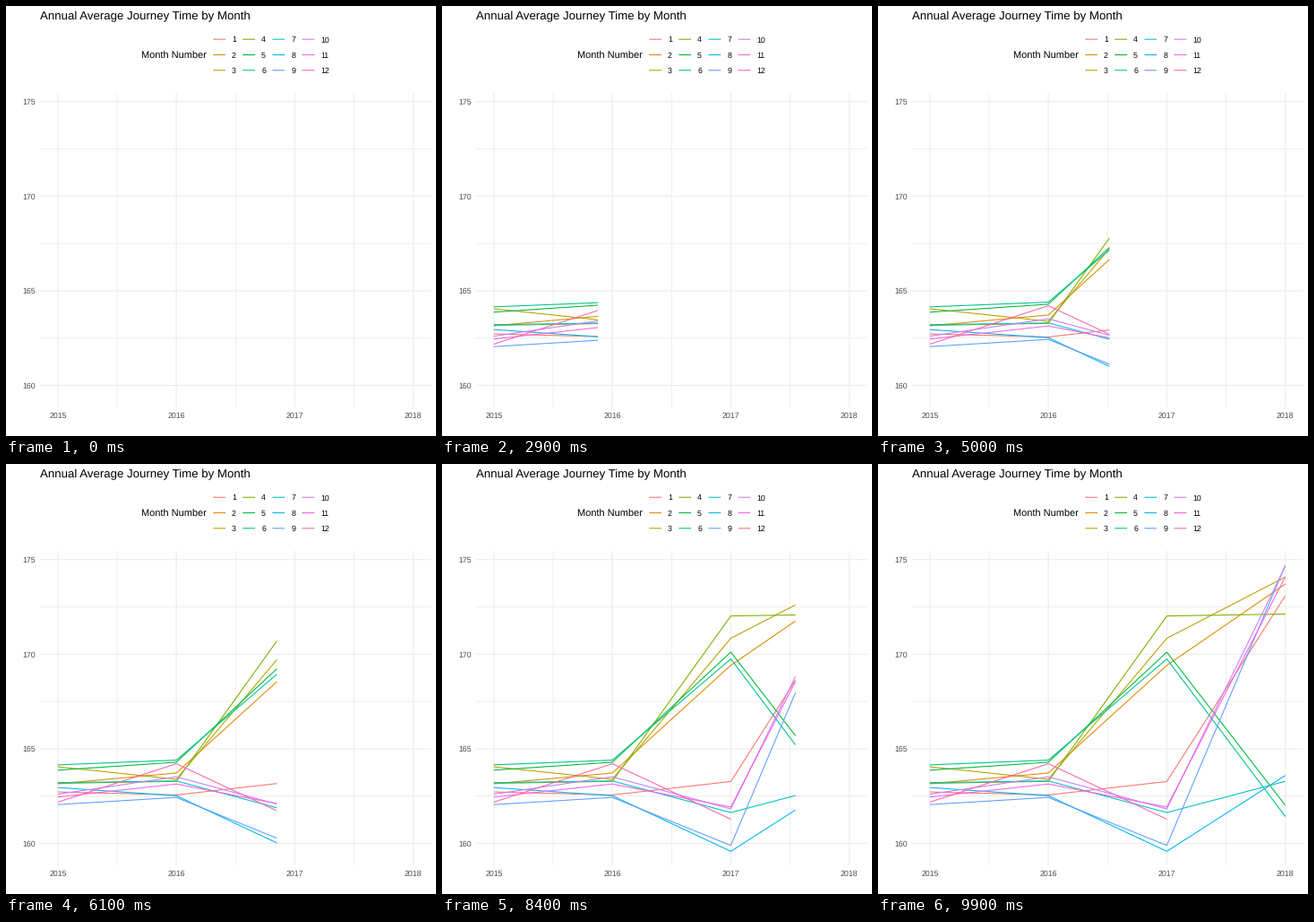
Animation, 480 px wide and 480 px high, one loop 10000 ms. Source, as a matplotlib script:

```python
import numpy as np
import matplotlib.pyplot as plt
from matplotlib.animation import FuncAnimation

SIZE, DPI = 480, 72  # at 72 dpi one point is one pixel
FRAMES, INTERVAL = 100, 100
LEFT, RIGHT, TOP, BOTTOM = 38, 474.5, 97, 448

plt.rcParams.update({
    "font.family": "Liberation Sans",
    "text.hinting": "none",
    "path.snap": False,
})

COLORS = ["#F8766D", "#DE8C00", "#B79F00", "#7CAE00", "#00BA38", "#00C08B",
          "#00BFC4", "#00B4F0", "#619CFF", "#C77CFF", "#F564E3", "#FF64B0"]

# Average journey time per month, one value per year from 2015
SERIES = [
    [162.72, 162.56, 163.27, 173.09],
    [163.15, 163.72, 169.41, 173.71],
    [164.05, 163.39, 170.84, 174.08],
    [163.17, 163.28, 172.02, 172.12],
    [163.87, 164.29, 170.11, 162.01],
    [164.15, 164.40, 169.75, 161.42],
    [163.21, 163.30, 161.63, 163.28],
    [162.95, 162.52, 159.58, 163.59],
    [162.05, 162.43, 159.89, 174.70],
    [162.60, 163.52, 161.82, 174.65],
    [162.45, 163.14, 161.92, 174.09],
    [162.18, 164.21, 161.28],
]


def px(year):
    return 57.85 + (np.asarray(year) - 2015) * 132.28


def py(value):
    return 423.5 - (np.asarray(value) - 160) * 21.12


fig = plt.figure(figsize=(SIZE / DPI, SIZE / DPI), dpi=DPI, facecolor="white")
ax = fig.add_axes([0, 0, 1, 1])
ax.set(xlim=(0, SIZE), ylim=(SIZE, 0))
ax.axis("off")


def stroke(xs, ys, color, width=1.07):
    return ax.plot(xs, ys, color=color, lw=width, solid_capstyle="butt",
                   solid_joinstyle="round", snap=False)[0]


def label(x, y, text, size=8.8, color="black", ha="left"):
    ax.text(x, y, text, size=size, color=color, ha=ha, va="baseline")


def grid(years, values, width):
    for v in values:
        stroke([LEFT, RIGHT], [py(v)] * 2, "#EBEBEB", width)
    for yr in years:
        stroke([px(yr)] * 2, [TOP, BOTTOM], "#EBEBEB", width)


years, ticks = range(2015, 2019), range(160, 176, 5)
grid([2015.5, 2016.5, 2017.5], [162.5, 167.5, 172.5], 0.8)
grid(years, ticks, 1.07)

for yr in years:
    label(px(yr), 460, str(yr), color="#4D4D4D", ha="center")
for v in ticks:
    label(33, py(v) + 3.2, str(v), color="#4D4D4D", ha="right")

label(38, 15, "Annual Average Journey Time by Month", 13.2)
label(151, 59, "Month Number", 11)
for i, color in enumerate(COLORS):
    col, row = divmod(i, 3)
    x, y = 231.2 + 33.1 * col, 37.22 + 17.28 * row
    stroke([x, x + 13.8], [y, y], color)
    label(x + 20.8, y + 3.2, str(i + 1))

lines = [stroke([], [], color) for color in COLORS]


def update(frame):
    now = 2015 + 3 * frame / (FRAMES - 1)
    for line, values in zip(lines, SERIES):
        known = 2015 + np.arange(len(values))
        end = min(now, known[-1])
        xs = np.append(known[known < end], end)
        line.set_data(px(xs), py(np.interp(xs, known, values)))
    return lines


anim = FuncAnimation(fig, update, frames=FRAMES, interval=INTERVAL,
                     repeat=True, repeat_delay=0, blit=False)
plt.show()
```
